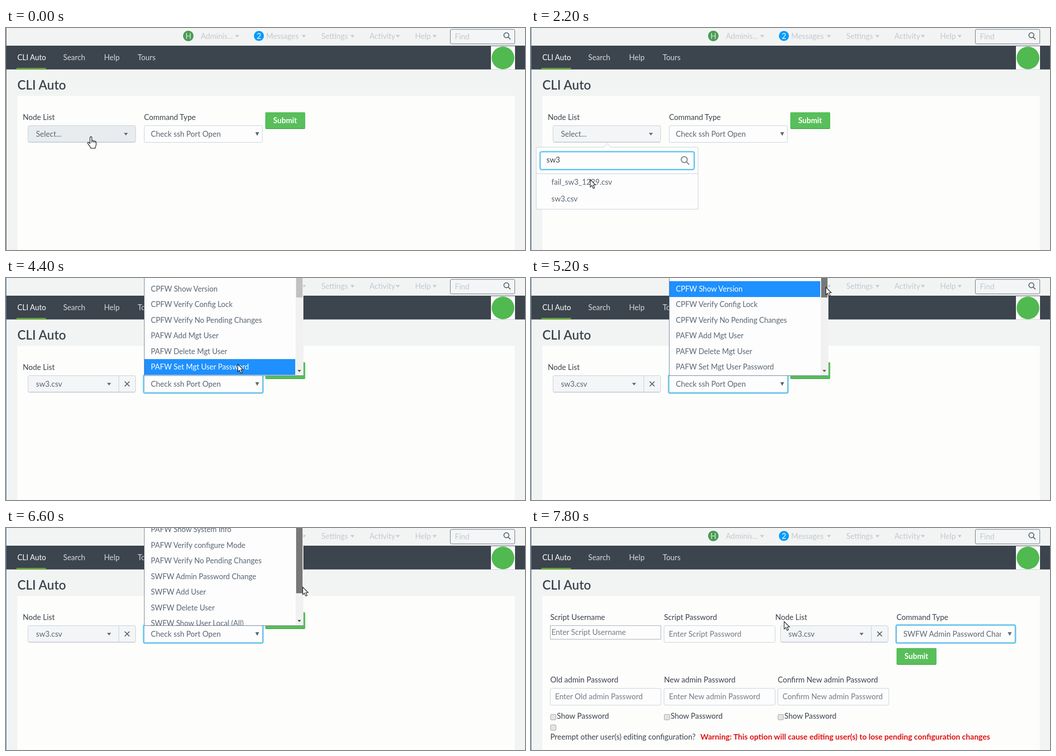
Write an HTML page that moves like this. It is 1143 by 490 pixels and loops after 8000 ms.

```html
<!DOCTYPE html>
<html lang="en">
<head>
<meta charset="utf-8">
<title>CLI Auto</title>
<style>
html, body { margin: 0; width: 100%; height: 100%; overflow: hidden; background: #f2f4f4; }
svg { display: block; width: 1143px; height: 490px; overflow: hidden; }
text { font: 400 16.7px Lato, "Open Sans", sans-serif; white-space: pre; }
#rows text { font-size: 16.3px; }
.bold { font-weight: 700; }
.warn { font-size: 17.1px; font-weight: 700; }
.title { font-size: 27.8px; font-weight: 600; }
.nav { font-size: 16.5px; }
.muted { fill: #c3c9cf; }
.label { fill: #3c444d; }
.value { fill: #5c6773; }
.hint { fill: #737d87; }
.box { fill: #fdfdfd; stroke: #c3cbd4; }
.ring { fill: none; stroke: #66c6f2; stroke-width: 3; }

/* One 8 s clock; every change is a hard step. */
.t { animation: 8s step-end -40ms infinite; }

.edge { animation-name: edge; }
@keyframes edge { 0% { fill: #4a4f55 } 5% { fill: #3a7cb8 } }

.hover { animation-name: hover; }
@keyframes hover { 0% { fill: #e8ecef } 7.5% { fill: #f3f5f7 } }

.empty { animation-name: empty; }
@keyframes empty { 0% { opacity: 1 } 35% { opacity: 0 } }
.chosen { animation-name: chosen; }
@keyframes chosen { 0% { opacity: 0 } 35% { opacity: 1 } }

.popup { animation-name: popup; }
@keyframes popup { 0% { opacity: 0 } 5% { opacity: 1 } 35% { opacity: 0 } }
.blank { animation-name: blank; }
@keyframes blank { 0% { opacity: 1 } 17.5% { opacity: 0 } }
.key1 { animation-name: key1; }
@keyframes key1 { 0% { opacity: 0 } 17.5% { opacity: 1 } 22.5% { opacity: 0 } }
.key2 { animation-name: key2; }
@keyframes key2 { 0% { opacity: 0 } 22.5% { opacity: 1 } 25% { opacity: 0 } }
.key3 { animation-name: key3; }
@keyframes key3 { 0% { opacity: 0 } 25% { opacity: 1 } }
.all { animation-name: all; }
@keyframes all { 0% { opacity: 1 } 22.5% { opacity: 0 } }
.found { animation-name: found; }
@keyframes found { 0% { opacity: 0 } 22.5% { opacity: 1 } }
.pick { animation-name: pick; }
@keyframes pick { 0% { opacity: 0 } 30% { opacity: 1 } }

.focus { animation-name: focus; }
@keyframes focus { 0% { opacity: 0 } 47.5% { opacity: 1 } }
.menu { animation-name: menu; }
@keyframes menu { 0% { opacity: 0 } 47.5% { opacity: 1 } 95% { opacity: 0 } }
.scroll { animation-name: scroll; }
@keyframes scroll {
  0% { transform: translateY(0) }
  67.5% { transform: translateY(-34px) }
  70% { transform: translateY(-76px) }
  72.5% { transform: translateY(-117px) }
  75% { transform: translateY(-154px) }
  77.5% { transform: translateY(-193px) }
  80% { transform: translateY(-227.5px) }
}
.thumb { animation-name: thumb, press; }
@keyframes thumb {
  0% { transform: translateY(0) }
  67.5% { transform: translateY(15px) }
  70% { transform: translateY(33px) }
  72.5% { transform: translateY(52px) }
  75% { transform: translateY(68px) }
  77.5% { transform: translateY(86px) }
  80% { transform: translateY(101px) }
}
@keyframes press { 0% { fill: #c1c1c1 } 65% { fill: #787878 } 85% { fill: #c1c1c1 } }
.mark { animation-name: mark; }
@keyframes mark {
  0% { transform: translateY(-200px) }
  55% { transform: translateY(172.5px) }
  57.5% { transform: translateY(103.5px) }
  60% { transform: translateY(34.5px) }
  62.5% { transform: translateY(0) }
  87.5% { transform: translateY(310.5px) }
}

.fields { animation-name: fields; }
@keyframes fields { 0% { transform: none } 95% { transform: translateX(501px) } }
.submit { animation-name: submit; }
@keyframes submit { 0% { transform: none } 95% { transform: translate(234px, 79px) } }
.before { animation-name: before; }
@keyframes before { 0% { opacity: 1 } 95% { opacity: 0 } }
.after { animation-name: after; }
@keyframes after { 0% { opacity: 0 } 95% { opacity: 1 } }

.cursor { animation-name: cursor; }
@keyframes cursor {
  0% { transform: translate(187px, 240px) }
  7.5% { transform: translate(176px, 262px) }
  10% { transform: translate(162px, 284px) }
  12.5% { transform: translate(160px, 288px) }
  27.5% { transform: translate(130px, 334px) }
  30% { transform: translate(96px, 370px) }
  35% { transform: translate(110px, 362px) }
  37.5% { transform: translate(240px, 310px) }
  40% { transform: translate(410px, 262px) }
  42.5% { transform: translate(456px, 246px) }
  50% { transform: translate(457px, 241px) }
  52.5% { transform: translate(472px, 232px) }
  55% { transform: translate(510px, 190px) }
  57.5% { transform: translate(560px, 130px) }
  60% { transform: translate(608px, 66px) }
  62.5% { transform: translate(636px, 27px) }
  65% { transform: translate(649px, 20px) }
  67.5% { transform: translate(650px, 38px) }
  70% { transform: translate(651px, 58px) }
  72.5% { transform: translate(652px, 78px) }
  75% { transform: translate(653px, 95px) }
  77.5% { transform: translate(653px, 113px) }
  80% { transform: translate(653px, 130px) }
  85% { transform: translate(646px, 127px) }
  87.5% { transform: translate(606px, 118px) }
  90% { transform: translate(591px, 114px) }
  95% { transform: translate(567px, 180px) }
  97.5% { transform: translate(557px, 206px) }
}
.hand { animation-name: hand; }
@keyframes hand {
  0% { opacity: 1 } 7.5% { opacity: 0 } 30% { opacity: 1 }
  35% { opacity: 0 } 42.5% { opacity: 1 } 47.5% { opacity: 0 }
}
.beam { animation-name: beam; }
@keyframes beam { 0% { opacity: 0 } 10% { opacity: 1 } 27.5% { opacity: 0 } }
.arrow { animation-name: arrow; }
@keyframes arrow {
  0% { opacity: 0 } 7.5% { opacity: 1 } 10% { opacity: 0 } 27.5% { opacity: 1 }
  30% { opacity: 0 } 35% { opacity: 1 } 42.5% { opacity: 0 } 47.5% { opacity: 1 }
}
</style>
</head>
<body>
<svg viewBox="0 0 1143 490">
  <defs>
    <path id="caret" d="M-4.5-2.5h9L0 3Z"/>
    <g id="lens" fill="none" stroke-width="2"><circle r="5.5"/><path d="M4 4l5 5"/></g>
    <rect id="check" x=".5" y=".5" width="12" height="12" rx="2" fill="#e4e4e4" stroke="#9a9a9a"/>
    <g id="rows">
      <text x="319" y="29.5">CPFW Show Version</text>
      <text x="319" y="64">CPFW Verify Config Lock</text>
      <text x="319" y="98.5">CPFW Verify No Pending Changes</text>
      <text x="319" y="133">PAFW Add Mgt User</text>
      <text x="319" y="167.5">PAFW Delete Mgt User</text>
      <text x="319" y="202">PAFW Set Mgt User Password</text>
      <text x="319" y="236.5">PAFW Show System Info</text>
      <text x="319" y="271">PAFW Verify configure Mode</text>
      <text x="319" y="305.5">PAFW Verify No Pending Changes</text>
      <text x="319" y="340">SWFW Admin Password Change</text>
      <text x="319" y="374.5">SWFW Add User</text>
      <text x="319" y="409">SWFW Delete User</text>
      <text x="319" y="443.5">SWFW Show User Local (All)</text>
    </g>
    <clipPath id="menuClip"><rect x="305" y="-10" width="333" height="225"/></clipPath>
    <clipPath id="markClip"><rect class="t mark" x="305" y="7" width="332" height="34.5"/></clipPath>
    <clipPath id="valueClip"><rect x="310" y="217" width="224" height="34"/></clipPath>
  </defs>

  <!-- page frame -->
  <rect width="1143" height="490" fill="#f2f4f4"/>
  <rect y="39" width="1143" height="52.5" fill="#3c444d"/>
  <rect x="25" y="150" width="1095.5" height="340" fill="#fdfdfc"/>
  <rect class="t edge" width="1" height="490"/>

  <circle cx="401.5" cy="17.5" r="11.5" fill="#4b9c55"/>
  <text x="401.5" y="23.5" text-anchor="middle" fill="#dcebdd">H</text>
  <circle cx="557" cy="17.5" r="11" fill="#0a9bfb"/>
  <text x="557" y="23.5" text-anchor="middle" fill="#fff">2</text>
  <g class="muted">
    <text x="429" y="24">Adminis...</text>
    <text x="573" y="24">Messages</text>
    <text x="694.5" y="24">Settings</text>
    <text x="800.5" y="24">Activity</text>
    <text x="901" y="24">Help</text>
    <use href="#caret" x="509" y="18"/>
    <use href="#caret" x="656" y="18"/>
    <use href="#caret" x="763" y="18"/>
    <use href="#caret" x="863" y="18"/>
    <use href="#caret" x="944" y="18"/>
  </g>
  <rect x="978.5" y="3" width="142" height="32" rx="3" fill="#f4f5f6" stroke="#5c6773"/>
  <text class="muted" x="988.5" y="24.5">Find</text>
  <use href="#lens" x="1102" y="16" stroke="#5c6773"/>

  <g fill="#d3d8dc">
    <text class="nav" x="25" y="70.5" fill="#fff">CLI Auto</text>
    <text class="nav" x="126" y="70.5">Search</text>
    <text class="nav" x="216" y="70.5">Help</text>
    <text class="nav" x="290" y="70.5">Tours</text>
  </g>
  <rect x="23" y="88" width="65" height="3.5" fill="#65a637"/>
  <rect x="1068" y="40" width="53" height="51.5" fill="#fdfdfd"/>
  <circle cx="1094.5" cy="66" r="25" fill="#50b94f"/>
  <text class="title label" x="25" y="135.5">CLI Auto</text>

  <!-- node list and command type -->
  <g class="t fields">
    <text class="label" x="37" y="203">Node List</text>
    <text class="label" x="304" y="203">Command Type</text>
    <rect class="t hover" x="48.5" y="215.5" width="237" height="36.5" rx="3" stroke="#c3cbd4"/>
    <path d="M50 252h234" stroke="#b3bcc5"/>
    <g class="t empty value">
      <text x="66" y="239.5">Select...</text>
      <use href="#caret" x="264" y="234"/>
    </g>
    <g class="t chosen value">
      <text x="66" y="239.5">sw3.csv</text>
      <use href="#caret" x="227" y="234"/>
      <path d="M248.5 216v36" stroke="#c3cbd4"/>
      <path d="M261.5 228.5l10.5 10.5m0-10.5l-10.5 10.5" stroke="#5c6773" stroke-width="2"/>
    </g>
    <rect class="box" x="304.5" y="215.5" width="260" height="37" rx="2"/>
    <rect class="t focus ring" x="303" y="214" width="263" height="40" rx="3"/>
    <g class="value" clip-path="url(#valueClip)">
      <text class="t before" x="319" y="239.5">Check ssh Port Open</text>
      <text class="t after" x="319" y="239.5">SWFW Admin Password Change</text>
    </g>
    <path class="value" d="M549 230h8.5l-4.25 8Z"/>
  </g>
  <g class="t submit">
    <rect x="571" y="186" width="88" height="37" rx="3" fill="#45a54a"/>
    <rect x="571" y="186" width="88" height="35.5" rx="3" fill="#58bf5b"/>
    <text class="bold" x="588.5" y="210" fill="#fff">Submit</text>
  </g>

  <!-- password form -->
  <g class="t after">
    <g class="label">
      <text x="42.5" y="203">Script Username</text>
      <text x="293" y="203">Script Password</text>
      <text x="42.5" y="341">Old admin Password</text>
      <text x="293" y="341">New admin Password</text>
      <text x="543.5" y="341">Confirm New admin Password</text>
      <text x="57" y="420.5">Show Password</text>
      <text x="307.5" y="420.5">Show Password</text>
      <text x="558" y="420.5">Show Password</text>
      <text x="42.5" y="467">Preempt other user(s) editing configuration?</text>
    </g>
    <rect x="42.5" y="215.5" width="243.5" height="30" fill="#fdfdfd" stroke="#a0a5aa"/>
    <rect class="box" x="293" y="215.5" width="244.5" height="37" rx="3"/>
    <rect class="box" x="42.5" y="354" width="243.5" height="37" rx="3"/>
    <rect class="box" x="293" y="354" width="244.5" height="37" rx="3"/>
    <rect class="box" x="543.5" y="354" width="244.5" height="37" rx="3"/>
    <g class="hint">
      <text x="45" y="236">Enter Script Username</text>
      <text x="303.5" y="239.5">Enter Script Password</text>
      <text x="53" y="377.5">Enter Old admin Password</text>
      <text x="304" y="377.5">Enter New admin Password</text>
      <text x="554" y="377.5">Confirm New admin Password</text>
    </g>
    <use href="#check" x="42.5" y="411"/>
    <use href="#check" x="293" y="411"/>
    <use href="#check" x="543.5" y="411"/>
    <use href="#check" x="42.5" y="434"/>
    <text class="warn" x="373" y="467" fill="#dc1414">Warning: This option will cause editing user(s) to lose pending configuration changes</text>
  </g>

  <!-- node list popup -->
  <g class="t popup">
    <g class="t all">
      <path class="box" d="M11.5 500V266q0-3 3-3H160l8-8 8 8h189q3 0 3 3v234Z"/>
      <g class="value">
        <text x="45" y="345.5">cp1.csv</text>
        <text x="45" y="383">ex1.csv</text>
        <text x="45" y="420.5">f10.csv</text>
        <text x="45" y="458">fail_sw3_1229.csv</text>
        <text x="45" y="495.5">fail_Test150_0827.csv</text>
      </g>
      <rect x="350" y="322" width="17" height="168" fill="#f1f1f1"/>
      <path d="M354.5 334h8l-4-4.5Z" fill="#8a8a8a"/>
      <rect x="351" y="340" width="15" height="40" fill="#c1c1c1"/>
    </g>
    <g class="t found">
      <path class="box" d="M11.5 400V266q0-3 3-3H160l8-8 8 8h189q3 0 3 3v134Z"/>
      <rect class="t pick" x="12" y="359" width="356" height="37" fill="#eceff2"/>
      <g class="value">
        <text x="45" y="345.5">fail_sw3_1229.csv</text>
        <text x="45" y="383">sw3.csv</text>
      </g>
    </g>
    <path d="M12 321.5h356" stroke="#c3cbd4"/>
    <rect class="ring" x="20" y="273" width="339.5" height="39.5" rx="4"/>
    <text class="t blank hint" x="34" y="297">filter</text>
    <g class="label">
      <text class="t key1" x="34" y="297">s</text>
      <text class="t key2" x="34" y="297">sw</text>
      <text class="t key3" x="34" y="297">sw3</text>
    </g>
    <use href="#lens" transform="translate(337.5 290.5) scale(1.2)" stroke="#818d99"/>
  </g>

  <!-- command type menu -->
  <g class="t menu">
    <rect x="304" y="-10" width="351" height="226" fill="#fdfdfd"/>
    <g clip-path="url(#menuClip)">
      <g class="t scroll">
        <use href="#rows" fill="#5c6773"/>
        <g clip-path="url(#markClip)">
          <rect x="305" width="332" height="480" fill="#1e90ff"/>
          <use href="#rows" fill="#fff"/>
        </g>
      </g>
    </g>
    <rect x="638" y="-10" width="17" height="225" fill="#f1f1f1"/>
    <rect class="t thumb" x="639" y="-150" width="14" height="193"/>
    <path d="M642 203h8l-4 4.5Z" fill="#505050"/>
    <path d="M304.5-5V215.5H655" fill="none" stroke="#64798c"/>
  </g>

  <!-- pointer -->
  <g class="t cursor">
    <path class="t hand" d="M-2 2a2 2 0 0 1 4 0v7c1-1 3-1 3.5.7 1-.9 3-.6 3.4.8 1.2-.6 2.6.2 2.6 1.8v5c0 4-2 4-2 8h-10c0-3-3.5-6-6-10-1.5-2.5.5-4 2.2-2.6L-2 15ZM2 9v4M5.5 9.7v3.5M8.9 10.5v3" fill="#fff" stroke="#111" stroke-width="1.3" stroke-linejoin="round"/>
    <path class="t beam" d="M-3.5-8.5H-1L0-7.5 1-8.5H3.5M0-7.5v15M-3.5 8.5H-1L0 7.5 1 8.5H3.5" fill="none" stroke="#222" stroke-width="1.6"/>
    <path class="t arrow" d="M.5.5V17l3.8-3.5L7 20l3-1.2-2.7-6.3h5Z" fill="#fff" stroke="#111" stroke-width="1.2"/>
  </g>
</svg>
</body>
</html>
```
